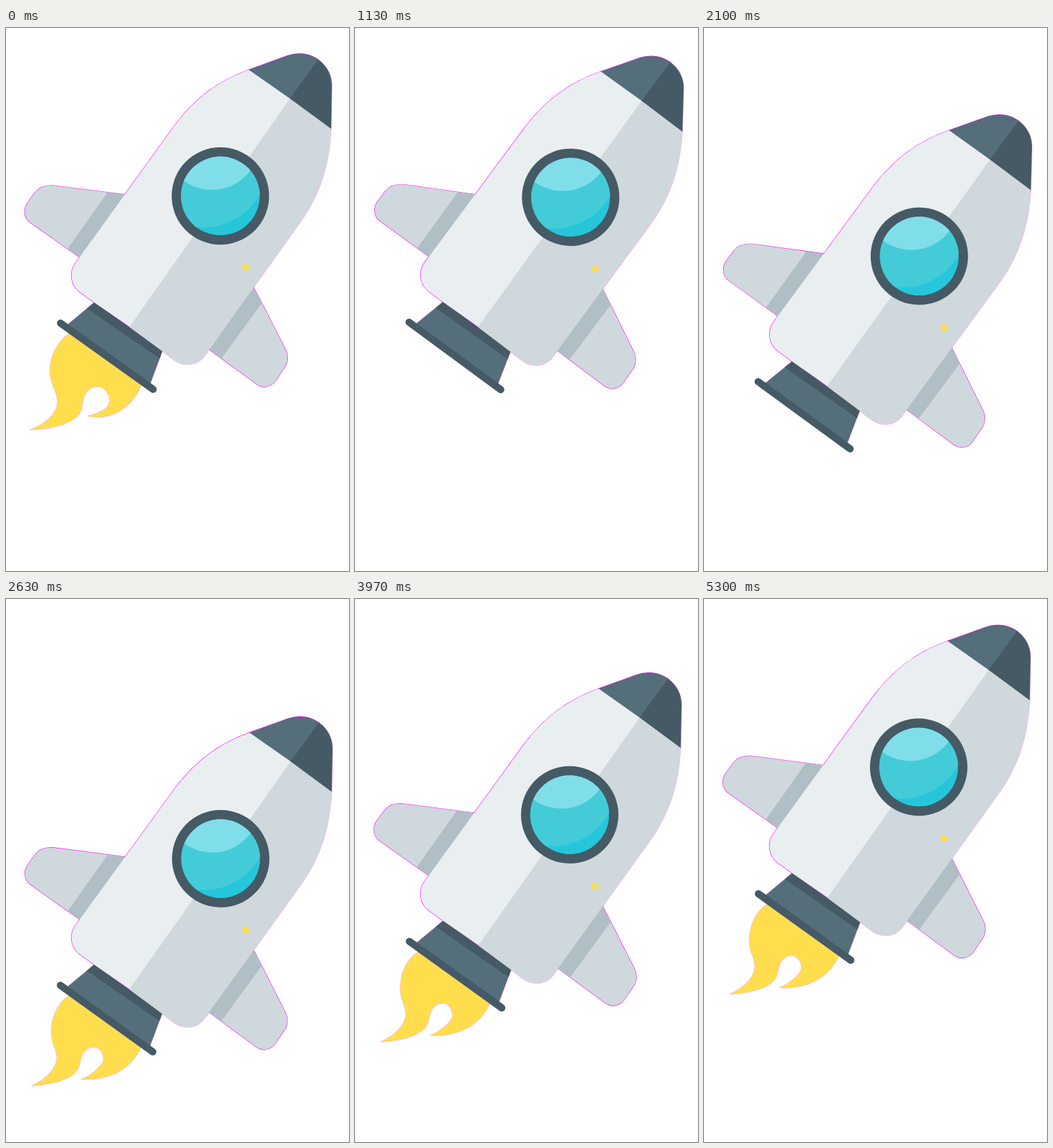
These frames come from a looping animation (500x792 px, 5.33 s). An HTML page:

```html
<!DOCTYPE html>
<html lang="en">
<head>
<meta charset="utf-8">
<title>Rocket</title>
<style>
  html, body { margin: 0; width: 100%; height: 100%; overflow: hidden; background: #fff; }
  svg { display: block; width: 100%; height: 100%; }
  .fringe { fill: none; stroke: #f0f; stroke-width: 1.2; }
  .soft { opacity: .35; }
</style>
</head>
<body>
<svg viewBox="0 0 500 792">
  <defs>
    <clipPath id="glass"><circle cx="312.5" cy="245" r="57.5"/></clipPath>
    <path id="leftWing" d="M175 243 L70 230 C58 229 48 232 42 240 L32 254 C25 263 26 275 33 282 L108 335Z"/>
    <path id="rightWing" d="M361 378 L408 470 C411 477 411 485 408 492 L394 513 C387 524 375 526 365 519 L295 468Z"/>
    <path id="bodyLeft" d="M354 61 C310 77 275 102 243 146 L101 343 C92 356 94 374 106 384 L128 400 L182 437 L416 102 L357 60Z"/>
    <path id="bodyRight" d="M414 101 L474 145 C472 195 460 238 432 279 L290 478 C280 492 261 495 246 485 L180 436 L414 103Z"/>
    <path id="noseLeft" d="M354 61 L410 40.5 C426 35 443 37 456 47 L415.5 104Z"/>
    <path id="noseRight" d="M455 46 C468 55 475 69 475 84 L474 147 L414 103Z"/>
    <path id="nozzle" d="M129 400 L228 471 L209.500 521 L87 435Z"/>
    <path id="flame"/>
  </defs>
  <g id="rocket">
    <g class="fringe">
      <use href="#leftWing"/><use href="#rightWing"/><use href="#bodyLeft"/><use href="#noseLeft"/>
      <g class="soft">
        <use href="#bodyRight"/><use href="#noseRight"/><use href="#nozzle"/><use href="#flame"/>
      </g>
    </g>
    <use href="#flame" fill="#ffde4d"/>
    <use href="#nozzle" fill="#546e7a"/>
    <path fill="#455a64" d="M129 400 L228 471 L224 482 L118 409Z"/>
    <path stroke="#455a64" stroke-width="10.500" stroke-linecap="round" d="M79.500 430.500 L214.500 527"/>
    <use href="#leftWing" fill="#cfd8dc"/>
    <path fill="#b0bec5" d="M148 239.600 L175 243 L108 335 L90 322Z"/>
    <use href="#rightWing" fill="#cfd8dc"/>
    <path fill="#b0bec5" d="M361 378 L373 401 L314 482 L295 468Z"/>
    <use href="#bodyLeft" fill="#e9eef0"/>
    <use href="#bodyRight" fill="#cfd8dc"/>
    <use href="#noseLeft" fill="#546e7a"/>
    <use href="#noseRight" fill="#455a64"/>
    <circle cx="312.500" cy="245" r="71" fill="#455a64"/>
    <g clip-path="url(#glass)">
      <circle cx="312.500" cy="245" r="57.500" fill="#26c6da"/>
      <circle cx="287" cy="196" r="95" fill="#43ccd8"/>
      <circle cx="300" cy="166" r="70" fill="#80deea"/>
    </g>
    <circle cx="349.500" cy="349" r="5" fill="#ffde4d"/>
  </g>
</svg>
<script>
  const LOOP = 5330, SHAKE = 10;
  const rocket = document.getElementById('rocket');
  const flame = document.getElementById('flame');

  // Eased 0 to 1 between two ticks, and back again after the second
  const swing = (tick, from, to) => (1 - Math.cos(Math.PI * (tick - from) / (to - from))) / 2;

  // A small dip, then a long fall and a slower climb
  function height(tick) {
    if (tick < 31) return 19 * swing(tick, 0, 15.5);
    if (tick < 86) return 139 * swing(tick, 31, 86);
    if (tick < 152) return 139 * (1 - swing(tick, 86, 152));
    return 0;
  }

  const isLit = tick => tick < 24 || tick >= 70;

  // Each key point drifts as the flame shrinks
  function flamePath(shrink) {
    const p = (x, y, dx, dy) => `${x + dx * shrink} ${y + dy * shrink} `;
    const side = p(64, 478, 10, -5) + p(64, 500, 10, -7);
    const waist = p(75, 528, 0, -26) + p(75, 545, -1, -33);
    const tail = p(58, 578, 4, -40) + p(35, 586, 12, -35);
    const notch = p(75, 584, -6, -37) + p(109, 574, -16, -33) + p(111, 551, -12, -24);
    const arch = p(124, 523, -15, -10) + p(134, 523, -19, -10);
    const hook = p(152, 535, -34, -12) + p(151, 545, -33, -22);
    const tip = p(135, 563, -37, -6) + p(119, 566, -34, 6);
    const belly = p(155, 573, -30, -15) + p(184, 553, -14, 12);
    return `M92 446 C76 456 ${side}S${waist}S${tail}C${notch}S${arch}S${hook}S${tip}C${belly}197 521Z`;
  }

  function draw(ms) {
    const tick = Math.floor((ms % LOOP + 5) * 3 / 100); // 30 poses per second
    const phase = tick % SHAKE;
    const tilt = Math.min(phase, SHAKE - phase) / (SHAKE / 2);

    rocket.setAttribute('transform', `translate(0 ${height(tick)}) rotate(${tilt} 250 380)`);
    flame.setAttribute('d', isLit(tick) ? flamePath(tilt / 0.8) : '');
  }

  const start = performance.now();
  function loop() {
    draw(performance.now() - start);
    requestAnimationFrame(loop);
  }
  loop();
</script>
</body>
</html>
```
